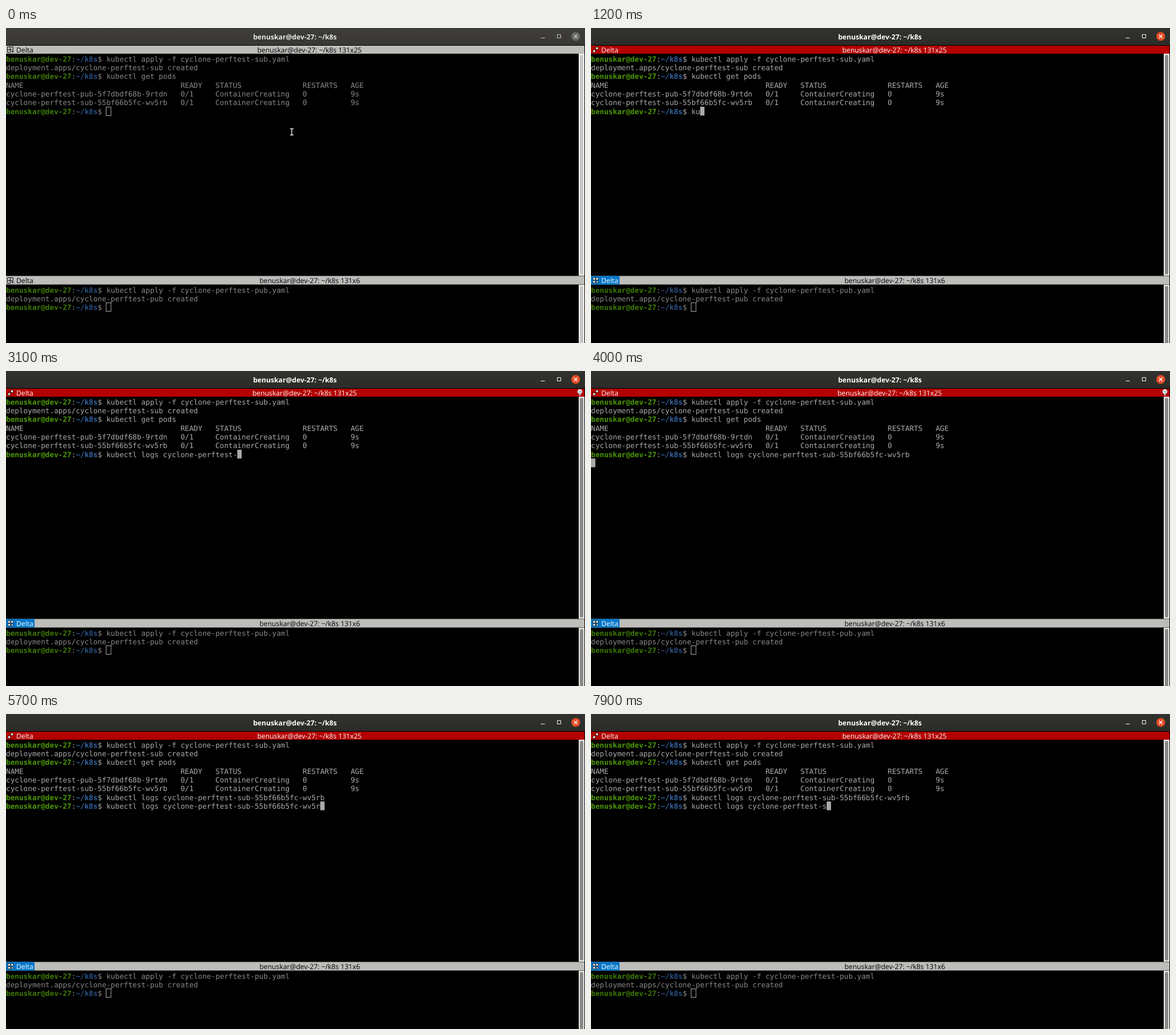
These frames come from a looping animation (1015 by 552 pixels, 8 s). An HTML page:

```html
<!DOCTYPE html>
<html lang="en">
<head>
<meta charset="utf-8">
<title>Terminal</title>
<style>
html, body { margin: 0; width: 100%; height: 100%; overflow: hidden; background: #000; }
svg { display: block; width: 1015px; height: 552px; }
text { white-space: pre; text-rendering: geometricPrecision; }
.ui { font: 12.17px "Open Sans", "Noto Sans", sans-serif; }
.title { font-weight: 700; }
.mid { text-anchor: middle; }
.pane { font: 12.71px "DejaVu Sans Mono", monospace; fill: #888; --user: #3e7b05; --path: #2a5183; }
.pane.live { fill: #aaa; --user: #4e9a06; --path: #3465a4; }
.user { fill: var(--user); font-weight: 700; }
.path { fill: var(--path); font-weight: 700; }
</style>
</head>
<body>
<svg id="stage" viewBox="0 0 1015 552"></svg>
<script>
const LOOP = 8000, CELL = 7.65, ROW = 15.3, PROMPT = 23;
const TOP = 46.2, BOTTOM = 451;
const HOST = 'benuskar@dev-27';
const COMMAND = 'kubectl logs cyclone-perftest-sub-55bf66b5fc-wv5rb ';

// [time, characters on the line]
const TYPING = [[0, 0], [1000, 1], [1200, 2], [1300, 3], [1400, 4], [1500, 5], [1700, 8],
  [2400, 10], [2500, 12], [2600, 13], [2900, 14], [3000, 15], [3100, 30], [3500, 31], [3700, 51]];
const ERASING = [[4000, 0], [5200, 51], [5500, 50], [5700, 49], [5800, 48], [6000, 47],
  [6200, 46], [6300, 45], [7000, 41], [7100, 38], [7300, 35], [7500, 34], [7600, 33],
  [7700, 32], [7900, 31]];
const FOCUS = [[0, 0], [300, 0.3], [400, 0.75], [500, 0.95], [600, 1]];

const at = (steps, t) => steps.reduce((value, [start, next]) => t >= start ? next : value, steps[0][1]);
const mix = (from, to, k) => `rgb(${from.map((c, i) => Math.round(c + (to[i] - c) * k))})`;

const rect = (x, y, w, h, fill, more = '') =>
  `<rect x="${x}" y="${y}" width="${w}" height="${h}" fill="${fill}" ${more}/>`;
const label = (x, y, text, more = '') => `<text class="ui" x="${x}" y="${y}" ${more}>${text}</text>`;
const line = (top, row, content, more = '') =>
  `<text x="0" y="${(top + 12.5 + row * ROW).toFixed(1)}" ${more}>${content}</text>`;
const prompt = (command = '') =>
  `<tspan class="user">${HOST}</tspan>:<tspan class="path">~/k8s</tspan>$ ${command}`;
const pod = (name, ready, status, restarts, age) =>
  name.padEnd(40) + ready.padEnd(8) + status.padEnd(20) + restarts.padEnd(11) + age;

const gridIcon = y => `<g fill="none" stroke="#111">
  <path d="M2.5 ${y + 2.5}h10v5M2.5 ${y + 2.5}v10h5M7.5 ${y + 2.5}v10M2.5 ${y + 7.5}h10"/>
  <path d="M9 ${y + 9.5}h5l-2.5 3z" fill="#111" stroke="none"/></g>`;
const tile = (x, y, size = 4) => rect(x, y, size, size, '#eee', 'stroke="#222" stroke-width=".8"');
const scrollbar = (y, h, slider) => rect(1004, y, 10, h, '', 'class="trough"') +
  rect(1006, y + 2, 6, slider, '', 'class="slider" rx="3"');

const stage = document.getElementById('stage');
stage.innerHTML = `
  <defs><linearGradient id="bar" x2="0" y2="1"><stop/><stop offset="1"/></linearGradient></defs>
  ${rect(0, 0, 1015, 552, '#000')}
  ${rect(0, 0, 1015, 30, 'url(#bar)')}
  ${label(506.5, 19.5, HOST + ': ~/k8s', 'id="title" class="ui title mid"').replace('class="ui" ', '')}
  <g id="buttons" fill="none">
    <path d="M937.5 17.5h7M966.5 11.5h6v6h-6z"/>
    <circle id="close" cx="998.7" cy="14.7" r="7.7"/>
    <path d="M995.7 11.7l6 6m0-6l-6 6" stroke-width="1.3"/>
  </g>
  ${rect(0, 31, 1014, 14, '', 'id="strip"')}
  <g id="idleTop">${gridIcon(30.5)}</g>
  <g id="liveTop">${tile(8.5, 33.5)}${tile(3.5, 38.5)}</g>
  <g id="stripText">${label(18, 42.5, 'Delta')}
    <g id="size">${label(532, 42.5, HOST + ': ~/k8s 131x25', 'text-anchor="middle"')}</g></g>
  <g id="bell"><circle cx="1006" cy="36" r="4.3" fill="#ddd" stroke="#888" stroke-width=".7"/>
    <path d="M1004.3 39h3.4v4h-3.4z" fill="#bbb"/>
    <path d="M1004.5 35l1.5 2 1.5-2M1004.5 41h3" fill="none" stroke="#777" stroke-width=".7"/></g>
  ${scrollbar(45, 389, 385)}
  ${rect(0, 434.5, 1014, 15, '#bdbdba')}
  ${rect(0, 434.5, 50, 15, '#0076c9', 'id="group"')}
  <g id="idleLow">${gridIcon(435)}</g>
  <g id="liveLow">${tile(3.5, 437.5)}${tile(8.8, 437.5)}${tile(3.5, 442.8)}${tile(9.3, 443.3, 3)}</g>
  ${label(18, 447, 'Delta', 'id="groupText"')}
  ${label(532.5, 447, HOST + ': ~/k8s 131x6', 'text-anchor="middle"')}
  ${scrollbar(450, 102, 110)}
  <g class="pane" id="upper">
    ${[prompt('kubectl apply -f cyclone-perftest-sub.yaml'),
       'deployment.apps/cyclone-perftest-sub created',
       prompt('kubectl get pods'),
       pod('NAME', 'READY', 'STATUS', 'RESTARTS', 'AGE'),
       pod('cyclone-perftest-pub-5f7dbdf68b-9rtdn', '0/1', 'ContainerCreating', '0', '9s'),
       pod('cyclone-perftest-sub-55bf66b5fc-wv5rb', '0/1', 'ContainerCreating', '0', '9s'),
       prompt('<tspan id="typed"></tspan>')].map((content, row) => line(TOP, row, content)).join('')}
    ${line(TOP, 7, prompt('<tspan id="recalled"></tspan>'), 'id="nextLine"')}
  </g>
  <g class="pane">
    ${[prompt('kubectl apply -f cyclone-perftest-pub.yaml'),
       'deployment.apps/cyclone-perftest-pub created',
       prompt()].map((content, row) => line(BOTTOM, row, content)).join('')}
  </g>
  ${rect(0, 0, CELL, ROW, '#aaa', 'id="cursor"')}
  ${rect(175.5, 138.5, 8.5, 15, 'none', 'id="hollow" stroke="#aaa"')}
  ${rect(175.5, 481.5, 8.5, 15, 'none', 'stroke="#aaa"')}
  <path id="pointer" d="M498 176.5h2l1 1 1-1h2M501 177.5v9M498 187.5h2l1-1 1 1h2"
    fill="none" stroke="#eee" stroke-width="1.4"/>`;

const $ = id => document.getElementById(id);
const show = (id, on) => $(id).setAttribute('visibility', on ? 'visible' : 'hidden');
const fillAll = (selector, color) =>
  stage.querySelectorAll(selector).forEach(node => node.setAttribute('fill', color));

function drawFrame(k) {
  const [upper, lower] = stage.querySelectorAll('stop');
  upper.setAttribute('stop-color', mix([62, 61, 58], [50, 50, 46], k));
  lower.setAttribute('stop-color', mix([57, 56, 53], [43, 44, 40], k));
  const ink = mix([205, 204, 200], [255, 255, 255], k);
  $('title').setAttribute('fill', mix([232, 231, 228], [255, 255, 255], k));
  $('buttons').setAttribute('stroke', ink);
  $('close').setAttribute('fill', mix([104, 103, 100], [228, 76, 40], k));
  $('close').setAttribute('stroke', 'none');
  fillAll('.trough', mix([240, 239, 238], [232, 231, 230], k));
  fillAll('.slider', mix([201, 200, 198], [139, 138, 136], k));
}

function render(t) {
  const live = t >= 300, entered = t >= 4000, ringing = t >= 3100 && t < 4100;
  drawFrame(at(FOCUS, t));

  $('strip').setAttribute('fill', live ? '#b40000' : '#bdbdba');
  $('stripText').setAttribute('fill', live ? '#fff' : '#000');
  $('groupText').setAttribute('fill', live ? '#fff' : '#000');
  $('size').setAttribute('transform', `translate(${ringing ? -8.5 : 0} 0)`);
  $('upper').classList.toggle('live', live);
  for (const id of ['liveTop', 'liveLow', 'group']) show(id, live);
  for (const id of ['idleTop', 'idleLow', 'hollow']) show(id, !live);
  show('bell', ringing);
  show('pointer', t < 1000);

  const count = at(entered ? ERASING : TYPING, t);
  $('typed').textContent = entered ? COMMAND : COMMAND.slice(0, count);
  $('recalled').textContent = entered ? COMMAND.slice(0, count) : '';
  show('nextLine', t >= 4100);

  const blinkedOff = (t >= 900 && t < 1000) || (t >= 4600 && t < 5200);
  const waiting = entered && t < 4100;
  $('cursor').setAttribute('x', waiting ? 0 : (PROMPT + count) * CELL);
  $('cursor').setAttribute('y', TOP + (entered ? 7 : 6) * ROW);
  show('cursor', live && !blinkedOff);
}

const began = performance.now();
function tick() {
  render((performance.now() - began) % LOOP);
  requestAnimationFrame(tick);
}
tick();
</script>
</body>
</html>
```
